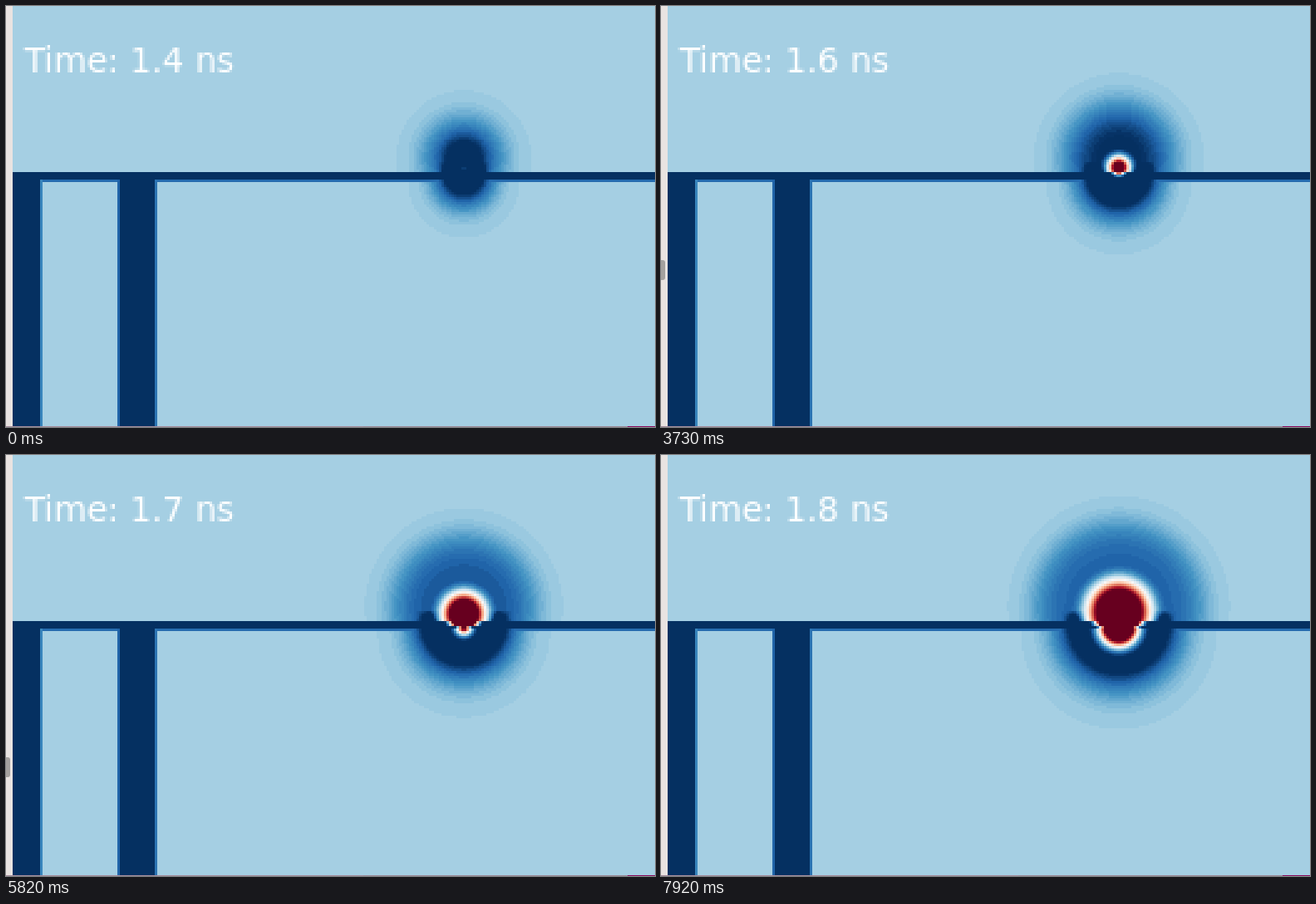
Write an HTML page with a canvas that moves like this. It is 781x507 px and loops after 8 s.

```html
<!DOCTYPE html>
<html lang="en">
<head>
<meta charset="utf-8">
<title>Field simulation</title>
<style>
  html, body { margin: 0; width: 100%; height: 100%; overflow: hidden; }
  canvas { display: block; width: 781px; height: 507px; }
</style>
</head>
<body>
<canvas id="stage" width="781" height="507"></canvas>
<script>
const LOOP = 8000;
const CELL = 3, LEFT = 8, TOP = -1, COLS = 258, ROWS = 169;
const CX = 551, BACKGROUND = 0.33, BAND = 0.018;

// [start ms, scroll position]; the scroll position drives the simulation time
const steps = [[0, 234], [1490, 241], [1640, 246], [2090, 256], [2240, 264],
  [2390, 271], [2530, 279], [2980, 283]];
for (let i = 0; i < 7; i++) steps.push([3430 + i * 148.4, 290.5 + i * 7.58]);
steps.push([4470, 342], [4620, 348], [4770, 354], [4920, 360], [5820, 364]);
for (let i = 0; i < 7; i++) steps.push([6270 + i * 150, i < 2 ? 370 + i * 6 : 376 + (i - 1) * 7.1]);
steps.push([7920, 414]);

const smoothSpans = [[1490, 1640], [2390, 2530], [4320, 4470], [7020, 7170]];
const thumbSpans = [[2090, 5520], [5820, 7770]];
const inside = (t, spans) => spans.some(([a, b]) => t >= a && t < b);

const stage = document.getElementById("stage").getContext("2d");
const grid = document.createElement("canvas");
grid.width = COLS;
grid.height = ROWS;
const gridCtx = grid.getContext("2d");

const palette = ["053061", "2166ac", "4393c3", "92c5de", "d1e5f0", "f7f7f7",
  "fddbc7", "f4a582", "d6604d", "b2182b", "67001f"]
  .map(hex => [0, 2, 4].map(i => parseInt(hex.slice(i, i + 2), 16)));

function colour(u) {
  if (u < BACKGROUND) u = BACKGROUND - BAND * Math.ceil((BACKGROUND - u) / BAND);
  const p = Math.min(1, Math.max(0, u)) * 10;
  const i = Math.min(9, Math.floor(p));
  return palette[i].map((c, k) => c + (palette[i + 1][k] - c) * (p - i));
}

// Raises the base level to full red inside a radius, fading over a width
function packet(base, distance, radius, width) {
  const f = Math.max(0, distance - radius) / width;
  return f >= 1 ? base : base + (1 - base) * (1 - f) ** 1.7;
}

function makeField(s) {
  const grow = s - 240, x = s - 279;
  const outerTop = 83 + 0.291 * grow;
  const outerLow = 68.5 + 0.286 * grow;
  const core = 25 + 0.205 * grow;
  const depth = 0.215 + 0.07 * Math.exp((336 - s) / 40);
  const hotY = 195.5 - 0.05 * Math.max(0, x);
  const hotR = 2 + 0.17 * x + 0.00014 * x * x;
  const hotW = 15 + 0.11 * x;
  const lowR = 2 + 0.29 * (s - 360);
  const lowW = 14 + 0.1 * (s - 360);

  function above(dx, y) {
    const d = outerTop - Math.hypot(dx, y - 183);
    if (d <= 0) return BACKGROUND;
    let u = BACKGROUND - depth * Math.tanh(9.2e-5 * d * d / depth);
    if (y > 188) {
      u -= 0.3 * Math.exp(-(((dx - core + 9) / 10) ** 2)) * (y - 186) / 14;
    }
    return packet(u, Math.hypot(dx, y - hotY), hotR, hotW);
  }

  function below(dx, y) {
    const gap = outerLow - Math.hypot(dx, y - 212);
    if (gap <= 0) return BACKGROUND;
    const d = Math.hypot(dx, y - 203) - core;
    const u = d <= 0 ? 0 : BACKGROUND * (1 - (gap / (d + gap)) ** 2.3);
    return packet(u, Math.hypot(dx, y - 207), lowR, lowW);
  }

  return (px, y) => {
    const dx = Math.abs(px - CX);
    if (y < 200) return above(dx, y);
    if (px < 41 || (px > 137 && px < 179)) return 0;
    if (y < 206) return packet(0, Math.hypot(dx, y - hotY), hotR, hotW * 0.35);
    if (y < 209) return packet(0, Math.hypot(dx, y - 207), lowR, lowW * 0.6);
    if (px < 44) return 0.18;
    if (px > 134 && px < 137) return 0.1;
    if (px > 179 && px < 182) return 0.14;
    const u = below(dx, y);
    return y < 212 && dx > core ? Math.min(0.13, u) : u;
  };
}

function renderGrid(s) {
  const field = makeField(s);
  const image = gridCtx.createImageData(COLS, ROWS);
  for (let row = 0, at = 0; row < ROWS; row++) {
    for (let col = 0; col < COLS; col++, at += 4) {
      const u = field(LEFT + (col + 0.5) * CELL, TOP + (row + 0.5) * CELL);
      image.data.set([...colour(u), 255], at);
    }
  }
  gridCtx.putImageData(image, 0, 0);

  gridCtx.setTransform(1 / CELL, 0, 0, 1 / CELL, -LEFT / CELL, -TOP / CELL);
  gridCtx.font = '41px "DejaVu Sans", sans-serif';
  gridCtx.fillStyle = "#fff";
  const tenths = Math.floor(15 + (s - 260) / 45);
  gridCtx.fillText(`Time: ${(tenths / 10).toFixed(1)} ns`, 22, 80);
  gridCtx.setTransform(1, 0, 0, 1, 0, 0);
}

function rect(fill, x, y, w, h) {
  stage.fillStyle = fill;
  stage.fillRect(x, y, w, h);
}

let shown = null;
function draw(t) {
  const [, s] = steps.findLast(([start]) => t >= start - 0.5);
  if (s !== shown) {
    renderGrid(s);
    shown = s;
  }
  stage.imageSmoothingEnabled = inside(t, smoothSpans);
  stage.drawImage(grid, LEFT, TOP, COLS * CELL, ROWS * CELL);
  rect("#e9e3e1", 0, 0, LEFT, 506);

  if (inside(t, thumbSpans)) {
    stage.fillStyle = "#a5a19f";
    stage.beginPath();
    stage.roundRect(-4, Math.round(s), 9, 24, 3);
    stage.fill();
  }

  rect("#a38c9c", 0, 506, 430, 1);
  rect("#9a8a98", 430, 506, 318, 1);
  rect("#8a0a5c", 748, 506, 33, 1);
}

function frame() {
  draw(performance.now() % LOOP);
  requestAnimationFrame(frame);
}
frame();
</script>
</body>
</html>
```
